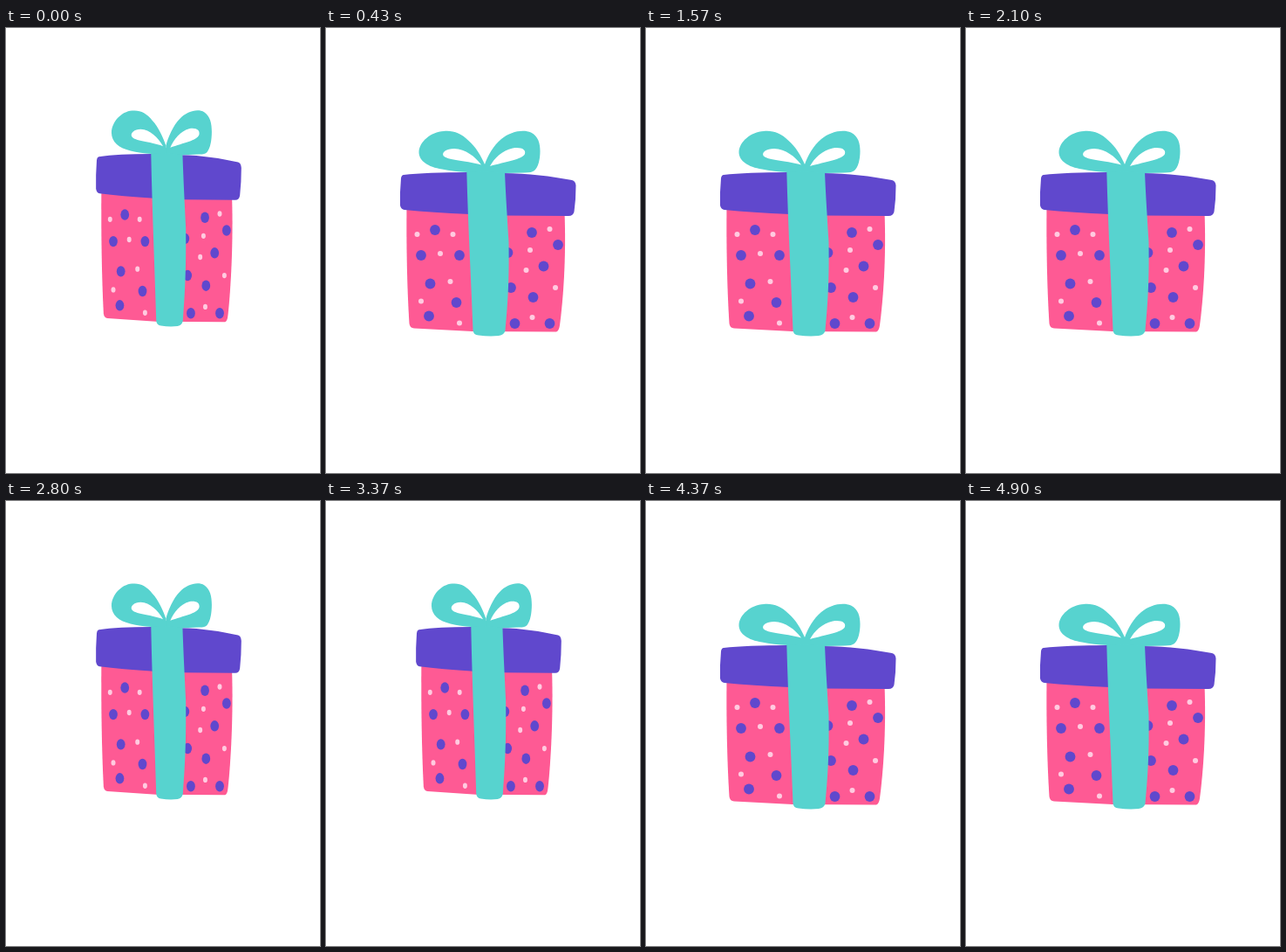
An HTML page for the animation above (5030 ms loop, 360 by 509 pixels).

```html
<!DOCTYPE html>
<html lang="en">
<head>
<meta charset="utf-8">
<title>Bouncing gift</title>
<style>
html, body { margin: 0; width: 100%; height: 100%; overflow: hidden; background: #fff; }
svg { display: block; width: 100vw; height: 100vh; }
</style>
</head>
<body>
<svg viewBox="0 0 360 509">
  <g id="gift">
    <path fill="#fe5a94" d="M92.5 204C92 250 93 300 95.5 338Q96 343 101 343.5L168 347L264 347.5Q267 347 268 340C272 310 275.5 262 273.5 211Z"/>
    <g id="dots"></g>
    <path fill="#6048cd" d="M89 168Q115 165 163 165L165 213Q120 211 90 208Q86 207.5 85 203Q84.5 188 86 172Q86.5 168.3 89 168Z
      M203 166C232 166.5 258 169.5 282 174Q286 175 286.5 180Q286.5 196 284.5 210Q283.5 215 278 215L205 214.5Z"/>
    <g fill="#57d3cf" fill-rule="evenodd">
      <path d="M161.3 164Q165 161 182 158L205 165C206 190 208 220 209.5 245C210 285 209 310 205.5 346Q204.5 351 198 352Q187 353 175 351.5Q169 351 168.5 346C166.5 290 163 230 161.3 164Z"/>
      <path d="M182 156C178 147 172 136 163 128.5C155 120.5 146 117 135 118C120 119 107 130 106.5 142C106.5 152 117 159 133 161.5Q146 164 163 165L182 164Z
        M178 156.5C171 147 160 138.5 147 138C138 138 132.5 142 134.5 146C139 151.5 158 151 178 156.5Z"/>
      <path d="M182 156C185 147 192 134 201 127C211 118.5 226 115.5 235 119.5C243.5 124 245.5 132 245.5 141C245.5 150 243.5 159 239 163Q236 165.5 228 165.5L205 166L182 164Z
        M188 158C193 149 202 140 214 137.5C224 136 229.5 139 228 144C225 150.5 206 153 188 158Z"/>
    </g>
  </g>
</svg>
<script>
const gift = document.getElementById('gift');

// A row of evenly spaced dots, every second one shifted by zig.
// S is a big spot, o a small fleck.
function row(kinds, x, y, step, zig) {
  return [...kinds].map((kind, i) => {
    const [r, fill] = kind === 'S' ? [5.9, '#6048cd'] : [3, '#ffcbe0'];
    return `<circle cx="${x + i * step}" cy="${y + (i % 2) * zig}" r="${r}" fill="${fill}"/>`;
  }).join('');
}

document.getElementById('dots').innerHTML = [
  row('oSo', 104.5, 236, 20.5, -5),
  row('SoS', 109, 260, 22, -2),
  row('So', 119.5, 292.5, 23, -2.5),
  row('oS', 109, 312.5, 40.5, 1.5),
  row('So', 118, 329.5, 35, 8),
  row('So', 236, 234, 20.5, -4),
  row('S', 208.5, 257, 0, 0),
  row('oS', 234, 254, 32, -6),
  row('oS', 229.5, 277, 20, -4.5),
  row('SSo', 212, 297, 25.5, 11),
  row('SoS', 216.5, 338, 20, -7)
].join('');

const LOOP = 5030, BAR = 700, BEATS = [0, 170, 300, 430, 570];
const PIVOT_X = 186, PIVOT_Y = 352;

function stepAt(t) {
  const bar = Math.floor(t / BAR);
  const beat = BEATS.filter(b => b <= t % BAR).length - 1;
  return bar * BEATS.length + beat;
}

function draw(ms) {
  // k swings tall (-1), rest (0), squat (1), rest
  const k = Math.round(-Math.cos(stepAt(ms % LOOP) * Math.PI / 2));
  const sx = 1 + 0.178 * k + 0.005 * k * k;
  const sy = 1 - 0.053 * k;
  const x = PIVOT_X + 0.6 * k + 1.3 * k * k;
  const y = PIVOT_Y + 9 * k - 2 * k * k;
  gift.setAttribute('transform',
    `translate(${x} ${y}) scale(${sx} ${sy}) translate(${-PIVOT_X} ${-PIVOT_Y})`);
}

const start = performance.now();
function tick() {
  draw(performance.now() - start);
  requestAnimationFrame(tick);
}
tick();
</script>
</body>
</html>
```
